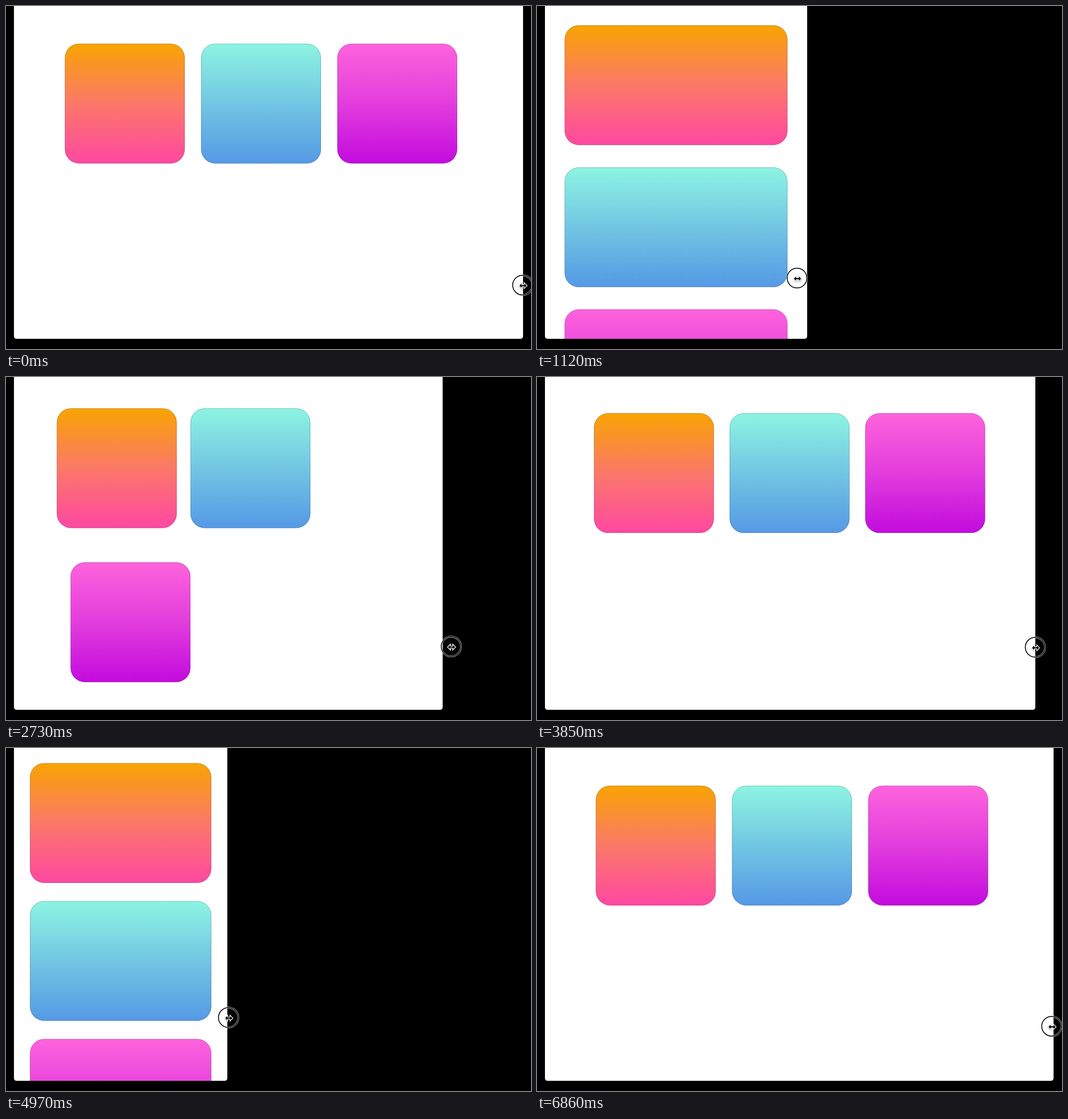
An HTML page with a canvas that plays this animation: 925 px wide and 605 px high, repeating every 6930 ms.

```html
<!DOCTYPE html>
<html lang="en">
<head>
<meta charset="utf-8">
<title>Responsive cards</title>
<style>
  html, body { margin: 0; width: 100%; height: 100%; overflow: hidden; background: #000; }
  canvas { display: block; }
</style>
</head>
<body>
<canvas id="stage" width="925" height="605"></canvas>
<script>
const ctx = document.getElementById('stage').getContext('2d');
const STEP = 70, COUNT = 99, MIRROR = 99.5;
const LEFT = 14, BOTTOM = 587, SIZE = 211.3;
const LAG = .55; // steps by which the window trails the pointer
const COLORS = [
  ['#f9a402', '#fb7868', '#ff48a2'],
  ['#8df4e2', '#71c6e3', '#5599e5'],
  ['#fe63dc', '#e23ddd', '#c30bde']
];

// Pulls of the window's right edge: [step, x], each easing out
const PULLS = [[0, 911], [2, 910], [10, 598], [16, 476], [20, 386], [29, 390], [44.5, 878], [51, 880]];

const easeOut = p => 1 - (1 - p) ** 1.45;

function edge(step) {
  const i = PULLS.findIndex(([end]) => step < end);
  const [t0, x0] = PULLS[i - 1], [t1, x1] = PULLS[i];
  return x0 + (x1 - x0) * easeOut((step - t0) / (t1 - t0));
}

function rounded(x, y, w, h, r) {
  ctx.beginPath();
  ctx.roundRect(x, y, w, h, r);
}

function card(x, y, w, colors) {
  const fill = ctx.createLinearGradient(0, y, 0, y + SIZE);
  colors.forEach((c, i) => fill.addColorStop(i / (colors.length - 1), c));
  rounded(x, y, w, SIZE, 25);
  ctx.fillStyle = fill;
  ctx.fill();
  rounded(x + .5, y + .5, w - 1, SIZE - 1, 24.5);
  ctx.strokeStyle = 'rgba(80,80,100,.3)';
  ctx.lineWidth = 1;
  ctx.stroke();
}

// Cards float inside a centred container and wrap when they no longer fit.
function layout(width) {
  const narrow = width < 545, box = width * (narrow ? .85 : .8);
  const gap = box * .04, rowGap = box * .1;
  const start = LEFT + (width - box) / 2;
  let x = 0, y = rowGap - 5.3;
  COLORS.forEach((colors, i) => {
    const margin = i && !narrow ? gap : 0, w = narrow ? box : SIZE;
    if (i && x + margin + w > box) {
      x = 0;
      y += SIZE + rowGap;
    }
    card(start + x + margin, y, w, colors);
    x += margin + w;
  });
}

function pointer(x, y) {
  ctx.beginPath();
  ctx.arc(x, y, 17.4, 0, 7);
  ctx.strokeStyle = 'rgba(255,255,255,.8)';
  ctx.lineWidth = 2.9;
  ctx.stroke();
  ctx.strokeStyle = '#000';
  ctx.lineWidth = 1.5;
  ctx.stroke();

  ctx.save();
  ctx.translate(x + .8, y + 1);
  ctx.beginPath();
  // One quarter of the double arrow, mirrored round
  const quarter = [[-6.3, 0], [-2.6, -3.8], [-2.6, -1.1]];
  const flip = (sx, sy) => quarter.map(([a, b]) => [a * sx, b * sy]);
  [...quarter, ...flip(-1, 1).reverse(), ...flip(-1, -1), ...flip(1, -1).reverse()]
    .forEach(p => ctx.lineTo(...p));
  ctx.closePath();
  ctx.shadowColor = 'rgba(0,0,0,.4)';
  ctx.shadowBlur = 2;
  ctx.shadowOffsetY = 1;
  ctx.strokeStyle = '#fff';
  ctx.lineWidth = 2.4;
  ctx.stroke();
  ctx.shadowColor = 'transparent';
  ctx.fillStyle = '#000';
  ctx.fill();
  ctx.restore();
}

function draw(now) {
  const count = Math.floor(now / STEP) % COUNT;
  const step = Math.min(count, MIRROR - count); // out and back
  const right = edge(step);
  ctx.fillStyle = '#000';
  ctx.fillRect(0, 0, 925, 605);
  ctx.save();
  rounded(LEFT, -10, right - LEFT, BOTTOM + 10, 4.5);
  ctx.fillStyle = '#fff';
  ctx.fill();
  ctx.clip();
  layout(right - LEFT);
  ctx.restore();
  pointer(edge(step + LAG) - .5, 475 + .015 * (step - 34) ** 2);
}

const begin = performance.now();
function tick() {
  draw(Math.max(0, performance.now() - begin));
  requestAnimationFrame(tick);
}
tick();
</script>
</body>
</html>
```
